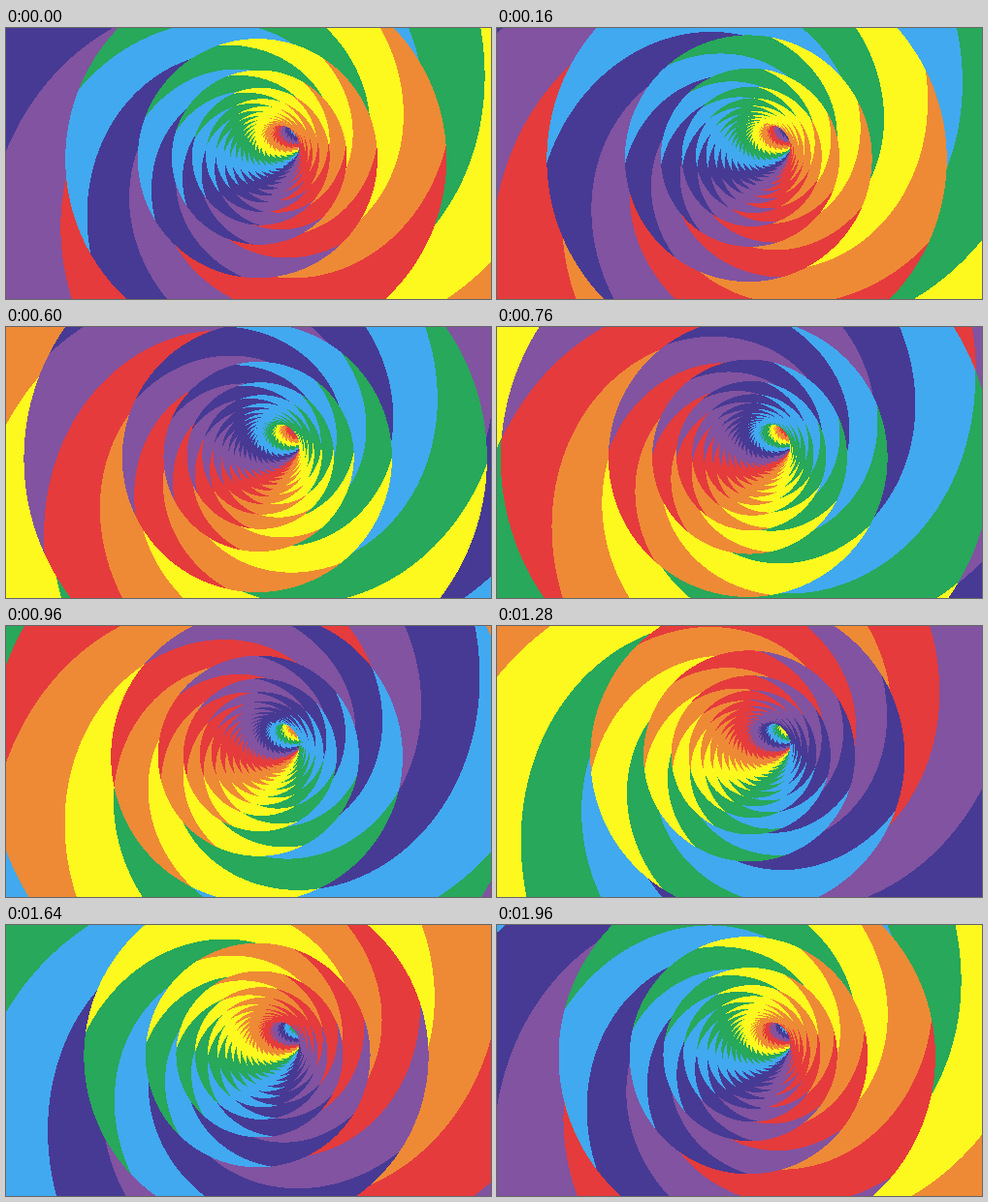
An HTML page with a canvas for the animation above (2 s loop, 500 by 280 pixels).

```html
<!DOCTYPE html>
<html lang="en">
<head>
<meta charset="utf-8">
<title>Rainbow tunnel</title>
<style>
html, body { margin: 0; width: 100%; height: 100%; overflow: hidden; background: #473a94; }
canvas { display: block; width: 500px; height: 280px; }
</style>
</head>
<body>
<canvas id="stage" width="500" height="280"></canvas>
<script>
const W = 500, H = 280, LOOP = 2000, STEP = 40;
const RADIUS = 333;      // ring radius at depth 1
const TWIST = 5.3;       // how strongly the blades spiral inwards
const ctx = document.getElementById('stage').getContext('2d');
const image = ctx.createImageData(W, H);
const pixels = new Uint32Array(image.data.buffer);

const rainbow = ['e53b3c', 'ee8a36', 'fdf91f', '27a85a', '41a9f0', '473a94', '8153a1'].map(hex => {
  const n = parseInt(hex, 16);
  return (255 << 24 | (n & 255) << 16 | (n & 0xff00) | n >> 16) >>> 0;
});

// The tunnel's axis drifts up and to the right with depth.
const axisX = d => 254.8 + 1.7 * d;
const axisY = d => 137.4 - d;

// Colour offset of the ring that begins at depth d.
const ringPhase = d => 7.44 - 0.0075 * d * d;

// Colours swept by a blade between two depths; deeper rings sweep less.
const sweep = (from, to) => TWIST * Math.log((to + 1) / (from + 1));

// Negative while the point lies inside the ring at depth d.
function gap(x, y, d) {
  const dx = x - axisX(d), dy = y - axisY(d);
  return Math.sqrt(dx * dx + dy * dy) * d - RADIUS;
}

function colourAt(x, y, first, turn) {
  let d = first, near = gap(x, y, d), far = gap(x, y, d + 1);
  while (far <= 0 && d < 60) {
    d++;
    near = far;
    far = gap(x, y, d + 1);
  }
  const depth = d + near / (near - far);
  const angle = Math.atan2(y - axisY(depth), x - axisX(depth));
  const hue = ringPhase(d) + sweep(d, depth) + turn - angle * 7 / (2 * Math.PI);
  const i = Math.round(hue) % 7;
  return rainbow[i < 0 ? i + 7 : i];
}

function draw(p) {
  const first = 0.695 - p, turn = 7 * p;
  let i = 0;
  for (let y = 0; y < H; y++) {
    for (let x = 0; x < W; x++) {
      pixels[i++] = colourAt(x + 0.5, y + 0.5, first, turn);
    }
  }
  ctx.putImageData(image, 0, 0);
}

let shown = -1;
function tick() {
  const step = Math.floor(performance.now() % LOOP / STEP);
  if (step !== shown) {
    shown = step;
    draw(step * STEP / LOOP);
  }
  requestAnimationFrame(tick);
}
tick();
</script>
</body>
</html>
```
